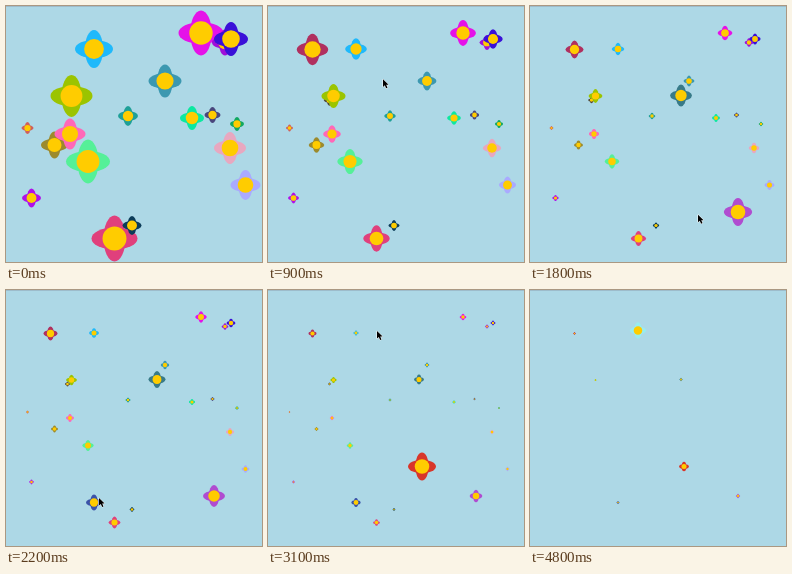
Write an HTML page with a canvas that moves like this. It is 256 by 256 pixels and loops after 4900 ms.

```html
<!DOCTYPE html>
<html lang="en">
<head>
<meta charset="utf-8">
<title>Shrinking flowers</title>
<style>
html, body { margin: 0; width: 100%; height: 100%; overflow: hidden; background: #add8e6; }
canvas { display: block; }
</style>
</head>
<body>
<canvas id="stage" width="256" height="256"></canvas>
<script>
const ctx = document.getElementById('stage').getContext('2d');
const LOOP = 4900, STEP = 100, DECAY = 0.62;

// x, y, radius at t = 0, colour; oldest first
const early = [
  [88, 43, 19, '#1fb9fb'],
  [195, 27, 22.5, '#e512e8'],
  [219, 36.5, 13, '#a010d8'],
  [225, 33, 17, '#3a10d8'],
  [159, 75, 16.5, '#3c98b0'],
  [122, 110, 10, '#1fa098'],
  [186, 112, 12, '#0ce8a0'],
  [206.5, 109, 8, '#49467c'],
  [231, 118, 7, '#10a860'],
  [21.5, 122, 6, '#d0605a'],
  [48.5, 139, 13.5, '#9c8a2c'],
  [64, 128, 15.5, '#ff68b8'],
  [82, 155.5, 22, '#55f098'],
  [224, 142, 16, '#e8a8c0'],
  [239.5, 179, 15, '#aaaaff'],
  [25.5, 192, 9.5, '#b010e8'],
  [108.5, 232.5, 23, '#e0407c'],
  [126, 219.5, 9.5, '#0c3c58'],
  [61.5, 94, 10, '#504838'],
  [65.5, 90, 21, '#9bc400']
].map(([x, y, r, color], i) => ({ x, y, r, color, born: 0, dies: 4270 + i * 28 }));

// x, y, radius when clicked, colour, click time
const clicked = [
  [44.5, 43.5, 18.9, '#b0305f', 600],
  [151, 89.5, 16.9, '#387a88', 1100],
  [208, 206, 17, '#b04cd0', 1500],
  [88, 212.5, 8.5, '#3a52a8', 2100],
  [154, 176.5, 17.9, '#d8362a', 2700],
  [108, 40.5, 22, '#98ecf0', 3200]
].map(([x, y, r, color, born]) => ({ x, y, r, color, born, dies: LOOP }));

const flowers = [...early, ...clicked];

// time, x, y of the pointer tip
const path = [
  [400, 2, 39], [500, 41, 43], [600, 44, 43], [700, 45, 44],
  [1000, 150, 88], [1100, 151, 90], [1400, 201, 191], [1500, 208, 206],
  [1700, 207, 207], [2000, 90, 212], [2100, 88, 212], [2200, 93, 208],
  [2600, 153, 176], [2700, 154, 176], [3000, 110, 43], [3100, 109, 41],
  [3200, 108, 40], [3400, 116, 8]
];

function ellipse(x, y, rx, ry, color) {
  ctx.fillStyle = color;
  ctx.beginPath();
  ctx.ellipse(x, y, rx, ry, 0, 0, 7);
  ctx.fill();
}

function drawFlower({ x, y, r, color, born, dies }, t) {
  if (t < born || t > dies) return;
  const size = r * Math.exp(-DECAY * (t - born) / 1000);
  ellipse(x, y, size, size * 0.48, color);
  ellipse(x, y, size * 0.48, size, color);
  ellipse(x, y, size * 0.52, size * 0.52, '#ffcc00');
}

function drawPointer(t) {
  const i = path.findIndex(p => p[0] >= t);
  if (i < 0 || t < path[0][0]) return;
  const [t1, x1, y1] = path[i];
  const [t0, x0, y0] = path[Math.max(i - 1, 0)];
  const k = t1 > t0 ? (t - t0) / (t1 - t0) : 1;
  ctx.save();
  ctx.translate(x0 + (x1 - x0) * k, y0 + (y1 - y0) * k);
  const arrow = new Path2D('M0 0V7.6L1.8 6L3.1 9L4.5 8.4L3.2 5.5H5.6Z');
  ctx.strokeStyle = '#fff';
  ctx.lineWidth = 1;
  ctx.stroke(arrow);
  ctx.fillStyle = '#000';
  ctx.fill(arrow);
  ctx.restore();
}

function draw(now) {
  const t = Math.floor(now % LOOP / STEP) * STEP;
  ctx.fillStyle = '#add8e6';
  ctx.fillRect(0, 0, 256, 256);
  ctx.fillStyle = '#9dbccb';
  ctx.fillRect(0, 0, 256, 1);
  flowers.forEach(f => drawFlower(f, t));
  drawPointer(t);
}

const start = performance.now();
function tick() {
  draw(performance.now() - start);
  requestAnimationFrame(tick);
}
tick();
</script>
</body>
</html>
```
